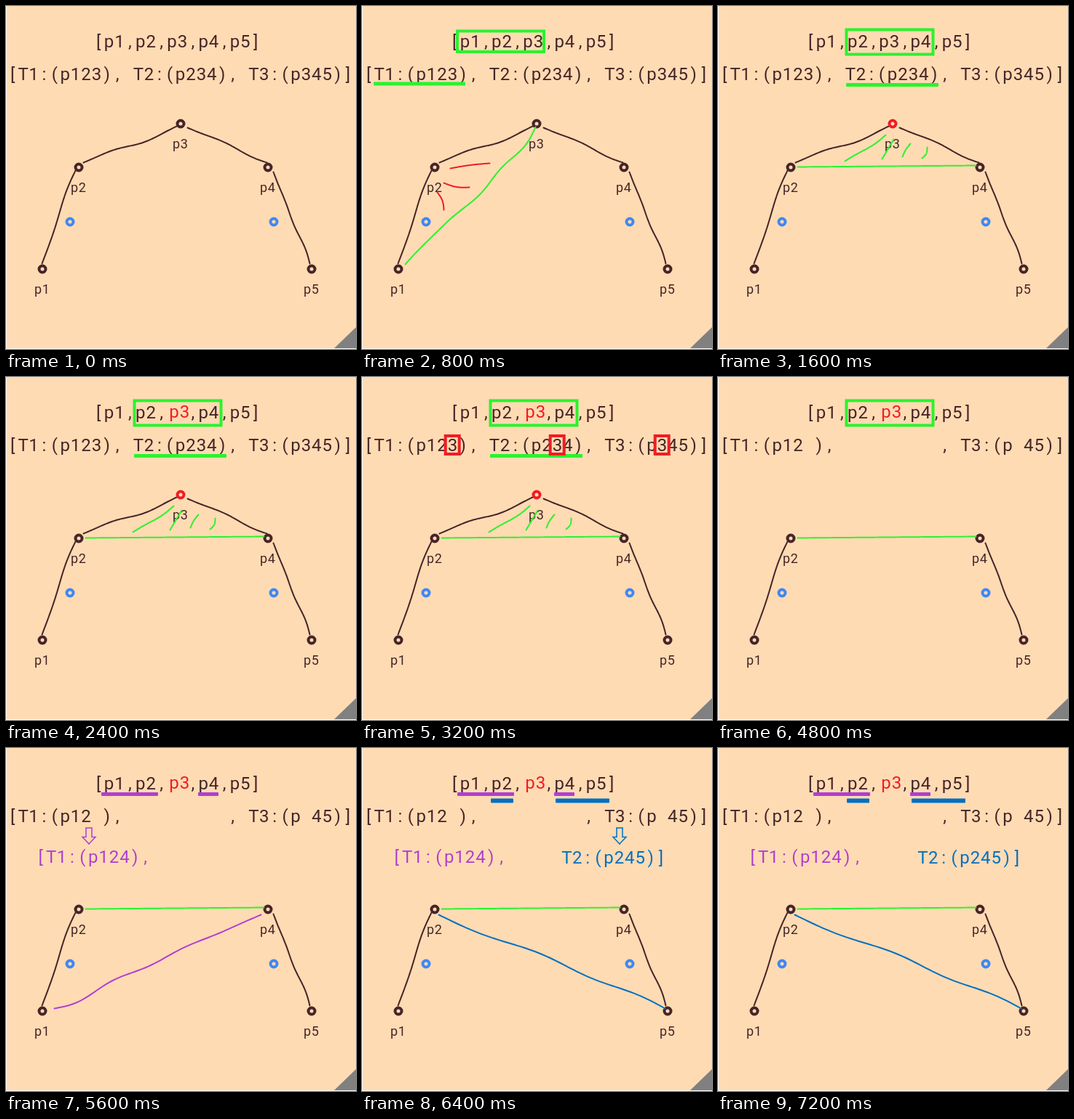
Write an HTML page with a canvas that moves like this. It is 481 by 472 pixels and loops after 8000 ms.

```html
<!DOCTYPE html>
<html lang="en">
<head>
<meta charset="utf-8">
<title>Removing a point from a triangle list</title>
<style>
  html, body { margin: 0; height: 100%; overflow: hidden; background: #fff; }
  canvas { display: block; }
</style>
</head>
<body>
<canvas id="stage" width="481" height="472"></canvas>
<script>
const ctx = document.getElementById('stage').getContext('2d');
const STEP_MS = 800, STEPS = 10, PITCH = 14.4, LIST_X = 2;
const PAPER = '#ffdbb3', INK = '#462428', RED = '#f01c24', GREEN = '#2bf22f',
      PURPLE = '#b03fd0', BLUE = '#0070c0', AZURE = '#3f87f5';

// Text on a fixed-pitch grid, each glyph centred in its cell.
function mono(text, x, y, color = INK, size = 24) {
  const pitch = size * PITCH / 24;
  ctx.font = `${size}px Roboto, sans-serif`;
  ctx.fillStyle = color;
  [...text].forEach((glyph, i) => ctx.fillText(glyph, x + (i + 0.5) * pitch, y));
}

function stroke(color, width, trace) {
  ctx.strokeStyle = color;
  ctx.lineWidth = width;
  ctx.beginPath();
  trace();
  ctx.stroke();
}

// Hand-drawn line: a straight one, pushed sideways by sine harmonics in pixels.
function sketch(color, x1, y1, x2, y2, ...harmonics) {
  const dx = x2 - x1, dy = y2 - y1, length = Math.hypot(dx, dy);
  stroke(color, 2, () => {
    for (let t = 0; t <= 1; t += 1 / 64) {
      const push = harmonics.reduce((sum, h, k) => sum + h * Math.sin((k + 1) * Math.PI * t), 0) / length;
      ctx.lineTo(x1 + dx * t - dy * push + 0.5, y1 + dy * t + dx * push + 0.5);
    }
  });
}

function underline(color, x1, x2, y, width = 5) {
  ctx.fillStyle = color;
  ctx.beginPath();
  ctx.roundRect(x1, y - width / 2, x2 - x1, width, 1);
  ctx.fill();
}

const box = (color, x, y, w, h) => stroke(color, 4, () => ctx.rect(x, y, w, h));
const ring = (x, y, color) => stroke(color, 4, () => ctx.arc(x, y, 4.5, 0, 7));

function point(name, x, y, color = INK) {
  ring(x, y, color);
  mono(name, x - 11.3, y + 34, INK, 18);
}

function downArrow(x, color) {
  const half = [[4, 110], [4, 122.5], [9, 122.5], [0, 132]];
  for (const side of [-1, 1])
    stroke(color, 1.5, () => half.forEach(([dx, y]) => ctx.lineTo(x + side * dx, y)));
  stroke(color, 1.5, () => { ctx.moveTo(x - 4, 110); ctx.lineTo(x + 4, 110); });
}

function drawPaper() {
  ctx.clearRect(0, 0, 481, 472);
  ctx.fillStyle = PAPER;
  ctx.fillRect(1, 0, 480, 471);
  ctx.fillStyle = '#808080';
  ctx.beginPath();
  ctx.moveTo(451, 471);
  ctx.lineTo(481, 442);
  ctx.lineTo(481, 471);
  ctx.fill();
}

function drawBase(step) {
  mono(step < 3 ? '[p1,p2,p3,p4,p5]' : '[p1,p2,  ,p4,p5]', 120, 57);
  if (step >= 3) mono('p3', 223.8, 56, RED);
  mono(step < 5 ? '[T1:(p123), T2:(p234), T3:(p345)]'
     : step < 6 ? '[T1:(p12 ), T2:(p2 4), T3:(p 45)]'
                : '[T1:(p12 ),          , T3:(p 45)]', LIST_X, 102);

  sketch(INK, 49, 354, 96, 224, -1.2, 1.4, -0.3);
  sketch(INK, 367, 228, 417, 354, -0.2, 0.5, -0.8, 0.6);
  point('p1', 50, 362);
  point('p2', 100, 222);
  point('p4', 360, 222);
  point('p5', 420, 362);
  ring(88, 297, AZURE);
  ring(368, 297, AZURE);

  if (step < 5) {
    sketch(INK, 106, 215, 234, 165, 1.8, -2.4, -0.2, 0.6);
    sketch(INK, 249, 167, 358, 215, -1, -1, 0.9);
    point('p3', 240, 162, step < 2 ? INK : RED);
  }
}

function drawMarks(step) {
  const during = (first, last = first) => step >= first && step <= last;

  if (during(1)) {
    box(GREEN, 131, 34.5, 119, 28.5);
    underline(GREEN, 16, 142, 107);
    sketch(GREEN, 59, 355, 238, 166, 5.9, -3, -0.2, -1, 1.6, -1);
    sketch(RED, 121, 223, 175, 216, -1);
    sketch(RED, 112, 243, 147, 249, 2.5);
    sketch(RED, 103, 256, 112, 280, -2.5);
  }

  if (during(2, 6)) box(GREEN, 176.5, 32.5, 119, 34);
  if (during(2, 9)) sketch(GREEN, 109, 221, 354, 219);
  if (during(2, 4)) {
    underline(GREEN, 176, 303, 108.5);
    sketch(GREEN, 174, 213, 230, 177, 1.8, -0.8);
    sketch(GREEN, 225, 210, 241, 183);
    sketch(GREEN, 253, 207, 264, 189, -1.2);
    sketch(GREEN, 280, 209, 287, 194, 2.5);
  }

  if (during(4))
    for (let column = 8; column <= 28; column += 10)
      box(RED, LIST_X + column * PITCH - 2.5, 81, 19, 25);
  if (during(5)) underline(RED, 174, 300, 112.5);

  if (during(7, 9)) {
    underline(PURPLE, 131, 209, 63.5);
    underline(PURPLE, 264, 292, 63.5);
    mono('[T1:(p124),', 40.5, 158, PURPLE);
  }
  if (during(7)) {
    downArrow(114, PURPLE);
    sketch(PURPLE, 66, 358, 350, 229, -0.8, 1.4, 0.9, 0.9, 1.8, 1.2);
  }

  if (during(8, 9)) {
    underline(BLUE, 177, 208, 72.5, 6);
    underline(BLUE, 266, 340, 72.5, 6);
    mono('T2:(p245)]', 274.2, 159, BLUE);
    sketch(BLUE, 105, 229, 416, 358, -1.7, 0.8, 1, 2, -0.8);
  }
  if (during(8)) downArrow(354, BLUE);
}

function frame() {
  const step = Math.floor(performance.now() / STEP_MS) % STEPS;
  drawPaper();
  drawBase(step);
  drawMarks(step);
  requestAnimationFrame(frame);
}

ctx.textAlign = 'center';
ctx.lineCap = 'round';
frame();
</script>
</body>
</html>
```
